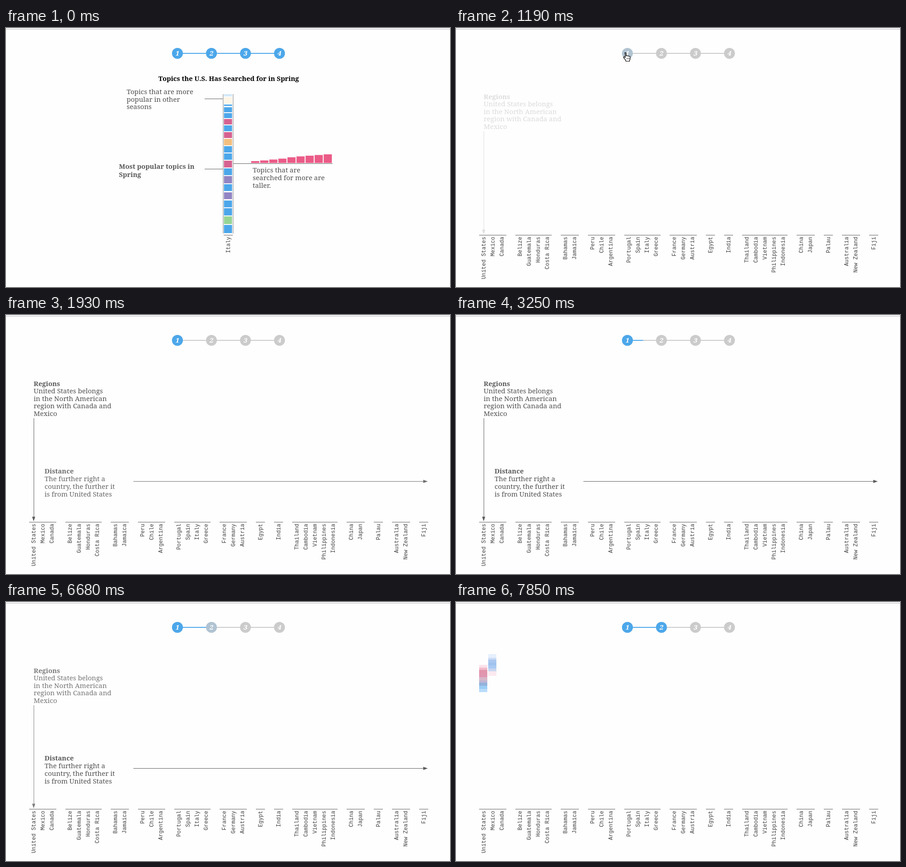
Animation of 979 by 572 pixels, one loop 8 s. Source, as an HTML page:

```html
<!DOCTYPE html>
<html lang="en">
<head>
<meta charset="utf-8">
<title>Seasonal topics</title>
<style>
html, body { margin: 0; width: 100%; height: 100%; overflow: hidden; background: #fefefe; }
svg { display: block; width: 979px; height: 572px; }
text { font: 15px "Noto Serif", serif; fill: #505050; }
text.b { font-weight: 700; font-size: 14.7px; fill: #585858; }
text.mono { font: 12px "Courier New", "Liberation Mono", monospace; fill: #404040; text-anchor: end; }
text.num { font: italic 700 15px "Noto Serif", serif; fill: #fff; text-anchor: middle; }
.rule { stroke: #5c5c5c; stroke-width: 1; }
</style>
</head>
<body>
<svg id="stage" viewBox="0 0 979 572"></svg>
<script>
const LOOP = 8000, STEP = 147.8, START = 450;
const BLUE = '#4ca7ea', GRAY = '#cbcbcb', PINK = '#d66291', PURPLE = '#9285c3';

const rect = (x, y, w, h, fill) => `<rect x="${x}" y="${y}" width="${w}" height="${h}" fill="${fill}"/>`;
const rule = (x1, y1, x2, y2) => `<path class="rule" d="M${x1} ${y1}L${x2} ${y2}"/>`;
const group = (id, body) => `<g id="${id}">${body}</g>`;
const text = (x, y, s, cls = '') => `<text x="${x}" y="${y}" class="${cls}">${s}</text>`;
const lines = (x, y, gap, list) => list.map((s, i) => text(x, y + i * gap, s)).join('');
const label = (x, s) => `<text class="mono" transform="translate(${x} 461) rotate(-90)">${s}</text>`;
const stack = (x, w, edges) => edges.map(([top, bottom, fill]) => rect(x, top, w, bottom - top, fill)).join('');

// Single-country column: top, bottom, colour
const column = [
  [146, 151, '#d4e9f9'], [153, 167, '#fff5e6'], [169, 172, BLUE], [175, 186, BLUE],
  [188, 199, BLUE], [201, 213, PINK], [215, 228, BLUE], [230, 243, PINK],
  [245, 259, '#f3be7e'], [261, 275, BLUE], [277, 291, BLUE], [293, 308, PINK],
  [310, 325, BLUE], [327, 343, PURPLE], [345, 360, BLUE], [363, 378, PURPLE],
  [381, 396, BLUE], [398, 414, BLUE], [416, 433, '#97d595'], [435, 453, BLUE]
];
const tops = [294, 292.5, 290.5, 288.5, 285.5, 283.5, 282, 280.5, 279];

const intro =
  `<text x="336" y="117" class="b" style="fill:#000">Topics the U.S. Has Searched for in Spring</text>` +
  lines(266, 146, 16.5, ['Topics that are more', 'popular in other', 'seasons']) +
  text(249, 311, 'Most popular topics in', 'b') + text(249, 328.5, 'Spring', 'b') +
  lines(544, 319, 17.2, ['Topics that are', 'searched for more are', 'taller.']) +
  rule(438, 156.5, 478, 156.5) + rule(438, 311.5, 478, 311.5) + rule(500, 299.5, 720, 299.5) +
  rect(478, 146, 1.5, 308, '#aaa') + rect(500, 146, 1.5, 308, '#aaa') +
  stack(480.5, 18, column) +
  tops.map((y, i) => rect(540.5 + 20 * i, y, 18, 298 - y, '#eb5b88')).join('') +
  rule(480, 457.5, 500, 457.5) + label(494, 'Italy');

const regions = [
  'United States,Mexico,Canada', 'Belize,Guatemala,Honduras,Costa Rica', 'Bahamas,Jamaica',
  'Peru,Chile,Argentina', 'Portugal,Spain,Italy,Greece', 'France,Germany,Austria', 'Egypt', 'India',
  'Thailand,Cambodia,Vietnam,Philippines,Indonesia', 'China,Japan', 'Palau', 'Australia,New Zealand', 'Fiji'
];
let left = 51;
const axis = regions.map(r => {
  const names = r.split(','), x = left, w = 20 * names.length;
  left += w + 20;
  return rule(x, 457.5, x + w, 457.5) + names.map((n, i) => label(x + 14 + 20 * i, n)).join('');
}).join('');

const region = text(61, 157, 'Regions', 'b') +
  lines(61, 173, 16.6, ['United States belongs', 'in the North American', 'region with Canada and', 'Mexico']) +
  rule(61.5, 228, 61.5, 447) + '<path d="M57.5 445.500h7l-3.500 10z" fill="#5c5c5c"/>';
const distance = text(85, 350, 'Distance', 'b') +
  lines(85, 366.5, 17, ['The further right a', 'country, the further it', 'is from United States']) +
  rule(281, 367.5, 922, 367.5) + '<path d="M920 364v7l10-3.500z" fill="#5c5c5c"/>';

const bars =
  stack(51, 18, [[139, 145, '#fbe2ea'], [145, 150, '#f0bccb'], [150, 158, '#e294ad'], [158, 166, '#e096b1'],
    [166, 173, '#d5b6c9'], [173, 178, '#c0b6d1'], [178, 185, '#93b2dc'], [185, 192, '#9bcdf5'], [192, 199, '#badcfb']]) +
  stack(71, 18, [[115, 123, '#e7f0fd'], [123, 127, '#cfdef6'], [127, 134, '#abc7ef'], [134, 140, '#a0c2ed'],
    [140, 147, '#aacaf3'], [147, 153, '#c9d7f0'], [153, 163, '#fce9f0']]);

const dots = [1, 2, 3, 4].map(n => {
  const x = 303 + 75 * n;
  return `<circle cx="${x}" cy="56" r="12" fill="${GRAY}"/>` +
    `<circle id="dot${n}" cx="${x}" cy="56" r="12" fill="${BLUE}"/>` + text(x, 61.3, n, 'num');
}).join('');

const hand = 'M3 1.500q2-1.500 3 .5v6q2-1.500 3 .3q2-1 3 .7q2.500-.8 3 1.500v4q0 2-1.500 3.500v2h-8v-2l-5-6q-.8-2.500 2-1.700l1.500 1.500v-9z';

const stage = document.getElementById('stage');
stage.innerHTML = rect(0, 2, 979, 1, '#b3b0b5') +
  rect(378, 55, 225, 2, GRAY) + `<rect id="progress" x="378" y="55" height="2" fill="${BLUE}"/>` + dots +
  group('intro', intro) + group('axis', axis) + group('region', region) +
  group('distance', distance) + group('bars', bars) +
  group('hand', `<path d="${hand}" fill="#fff" stroke="#000" stroke-width="1.2"/><path d="M8 12.500v3m2.500-3v3m2.500-3v3" stroke="#000" stroke-width=".8"/>`);

const part = id => document.getElementById(id);
const fade = (id, v) => part(id).setAttribute('opacity', v);

// Linear interpolation through [time, value] pairs
function track(t, keys) {
  if (t <= keys[0][0]) return keys[0][1];
  for (let i = 1; i < keys.length; i++) {
    const [a, u] = keys[i - 1], [b, v] = keys[i];
    if (t <= b) return u + (v - u) * (t - a) / (b - a);
  }
  return keys[keys.length - 1][1];
}

function draw(ms) {
  const step = Math.floor((ms - START + 10) / STEP);
  const t = START + STEP * step;
  const clicked = t > 1150;

  const shown = track(t, [[1045, 0], [1190, 0.2], [1480, 0.83], [1630, 1]]);
  const leaving = track(t, [[6535, 0], [6680, 0.25], [6830, 0.6], [7120, 1]]);
  fade('intro', clicked ? 0 : 1);
  fade('axis', clicked ? 1 : 0);
  fade('region', shown * (1 - leaving));
  fade('distance', track(t, [[1190, 0], [1480, 0.18], [1930, 0.88], [2220, 1], [6690, 1], [7120, 0.4], [7560, 0]]));
  fade('bars', t > 7800 ? 1 : 0);

  fade('dot1', clicked ? shown : 1);
  fade('dot2', clicked ? leaving : 1);
  fade('dot3', clicked ? 0 : 1);
  fade('dot4', clicked ? 0 : 1);

  const p = track(t, [[2372, 0], [4880, 1]]);
  const end = clicked ? 390 + 51 * (1 - (1 - p) ** 1.35) : 603;
  part('progress').setAttribute('width', end - 378);

  fade('hand', step >= 0 && t < 1300 ? 1 : 0);
  const away = (1 - track(t, [[300, 0], [1035, 1]])) ** 2;
  part('hand').setAttribute('transform', `translate(${369 + 150 * away} ${53.5 + 240 * away})`);
}

function tick(now) {
  draw(now % LOOP);
  requestAnimationFrame(tick);
}
draw(0);
requestAnimationFrame(tick);
</script>
</body>
</html>
```
